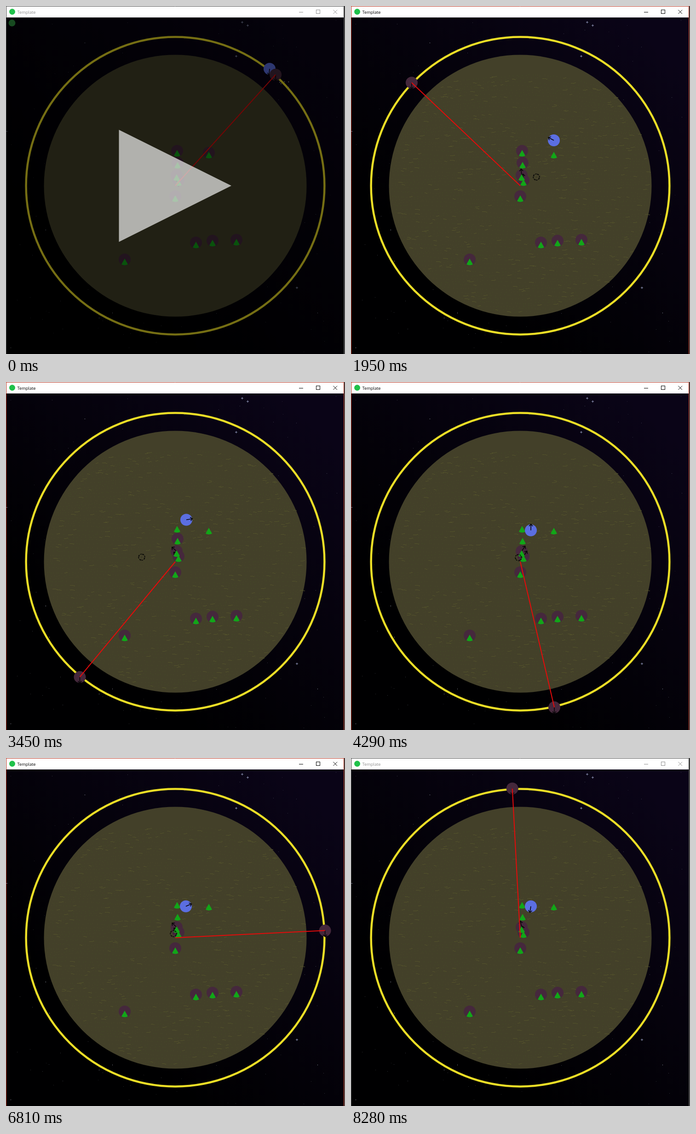
An HTML page with a canvas for the animation above (8340 ms loop, 737 by 759 pixels).

```html
<!DOCTYPE html>
<html lang="en">
<head>
<meta charset="utf-8">
<title>Template</title>
<style>
html, body { margin: 0; width: 100%; height: 100%; overflow: hidden; background: #000; }
canvas { display: block; }
</style>
</head>
<body>
<canvas id="stage" width="737" height="759"></canvas>
<script>
const W = 737, H = 759, LOOP = 8340, STEP = 30;
const START = 570, PAUSE = 5340, RESUME = 6590, BLUR = 8250;
const CX = 368, CY = 392, TAU = Math.PI * 2, DEG = Math.PI / 180;
const ctx = document.getElementById('stage').getContext('2d');

// The first three foes are the ones hit, in order; the next two overlap and swing.
const foes = [[441, 320], [372, 316], [373, 342], [375, 380], [371, 369],
  [368, 415], [413, 516], [449, 512], [501, 510], [258, 553]];
const home = { x: 573, y: 137 };
const hops = [
  { start: START, end: 1170, x: 441, y: 293 },
  { start: 2400, end: 2620, x: 392, y: 300.5 },
  { start: 3990, end: 4080, x: 391, y: 323.5 }];
const glides = [
  { start: 2250, end: 2900, x: 295, y: 382 },
  { start: 3930, end: 4200, x: 364, y: 383 },
  { start: 6900, end: 7380, x: 713, y: 73 },
  { start: 7410, end: 8220, x: 726, y: 37 }];

// Follows straight moves from a first point.
function follow(from, moves, t) {
  let { x, y } = from;
  for (const m of moves) {
    const k = Math.min(1, Math.max(0, (t - m.start) / (m.end - m.start)));
    x += (m.x - x) * k;
    y += (m.y - y) * k;
  }
  return [x, y];
}

// Time spent in play, without the start screen and the pause.
function playTime(t) {
  const run = Math.max(0, Math.min(t, BLUR) - START + STEP);
  const held = Math.max(0, Math.min(t, RESUME) - PAUSE);
  return t < START ? 0 : run - held;
}

function seeded(seed) {
  return () => (seed = (seed * 16807) % 2147483647) / 2147483647;
}

function layer(paint) {
  const c = document.createElement('canvas');
  c.width = W;
  c.height = H;
  paint(c.getContext('2d'));
  return c;
}

function disc(g, x, y, r, color) {
  g.fillStyle = color;
  g.beginPath();
  g.arc(x, y, r, 0, TAU);
  g.fill();
}

function line(g, color, width, ...pts) {
  g.strokeStyle = color;
  g.lineWidth = width;
  g.beginPath();
  pts.forEach(([x, y], i) => i ? g.lineTo(x, y) : g.moveTo(x, y));
  g.stroke();
}

const world = layer(g => {
  const sky = g.createLinearGradient(190, 560, 640, 60);
  sky.addColorStop(0, '#000001');
  sky.addColorStop(1, '#0a0417');
  g.fillStyle = sky;
  g.fillRect(0, 0, W, H);

  const rnd = seeded(71);
  for (let i = 0; i < 170; i++) {
    const x = rnd() * W | 0, y = 26 + rnd() * 730 | 0;
    g.fillStyle = i % 6 ? `rgba(150,155,175,${0.2 + rnd() * 0.3})` : '#c0c4d6';
    g.fillRect(x, y, 1, 1);
    if (i % 24) continue;
    g.fillStyle = '#8c91b4';
    g.fillRect(x - 2, y, 5, 1);
    g.fillRect(x, y - 2, 1, 5);
  }
  disc(g, CX, CY, 285.5, '#434029');
  g.strokeStyle = '#ecde26';
  g.lineWidth = 4.5;
  g.beginPath();
  g.arc(CX, CY, 324.4, 0, TAU);
  g.stroke();
});

const grass = layer(g => {
  const rnd = seeded(2024);
  for (let y = 150; y < 676; y += 7.5) {
    const bend = Math.max(0, (300 - y) / 150);
    for (let x = 84; x < 652; x += 3 + rnd() * 8) {
      const d = (x - CX) / 285;
      const py = y + bend * d * d * 60 + Math.sin(x / 37 + y) * 2 + rnd() * 3;
      const r = Math.hypot(x - CX, py - CY);
      if (r > 280 || r < 40) continue;
      const dash = rnd() < 0.09;
      g.fillStyle = dash ? '#54532b' : rnd() < 0.5 ? '#465223' : '#4c4b29';
      const len = dash ? 3 + rnd() * 6 | 0 : 1;
      g.fillRect(x | 0, py | 0, len, 1);
      if (dash) g.fillRect((x | 0) + len, (py | 0) + (rnd() < 0.5 ? 1 : -1), 3, 1);
    }
  }
});

function arrow(x, y, deg) {
  ctx.save();
  ctx.translate(x, y);
  ctx.rotate(-deg * DEG);
  line(ctx, '#080608', 1.6, [0, 0], [13, 0]);
  line(ctx, '#080608', 1.6, [9, -4], [13.5, 0], [9, 4]);
  ctx.restore();
}

function tree(x, y) {
  ctx.fillStyle = '#12a618';
  ctx.beginPath();
  ctx.moveTo(x, y - 2);
  ctx.lineTo(x + 7, y + 10.5);
  ctx.quadraticCurveTo(x, y + 14.5, x - 7, y + 10.5);
  ctx.fill();
}

function crosshair(x, y, t) {
  ctx.save();
  ctx.translate(x, y);
  ctx.rotate(t / 1000);
  ctx.setLineDash([3.4, 1.94]);
  ctx.strokeStyle = '#050505';
  ctx.lineWidth = 1.6;
  ctx.beginPath();
  ctx.arc(0, 0, 6.8, 0, TAU);
  ctx.stroke();
  ctx.setLineDash([]);
  for (let i = 0; i < 4; i++) {
    ctx.rotate(TAU / 4);
    line(ctx, '#050505', 1.2, [5, 0], [7.6, 0]);
  }
  ctx.restore();
  ctx.fillStyle = '#050505';
  ctx.fillRect(x - 0.5, y - 0.5, 1, 1);
}

function label(text, x, y, spacing = 0) {
  ctx.letterSpacing = spacing + 'px';
  ctx.fillText(text, x, y);
  ctx.strokeText(text, x, y);
  ctx.letterSpacing = '0px';
}

function pauseText() {
  ctx.fillStyle = ctx.strokeStyle = '#fff';
  ctx.lineWidth = 1.2;
  ctx.font = 'bold 23px "DejaVu Sans Mono", monospace';
  label('PAUSE', 328.5, 291);
  label('Resume', 291.5, 315, 1.5);
  label(':', 389.5, 315);
  label('[P]', 403, 315);
}

function startScreen() {
  ctx.fillStyle = 'rgba(0,0,0,.5)';
  ctx.fillRect(0, 25, W, H);
  disc(ctx, 13, 37, 7.5, '#174a20');
  ctx.fillStyle = 'rgba(255,255,255,.65)';
  ctx.beginPath();
  ctx.moveTo(245.5, 270);
  ctx.lineTo(490, 392);
  ctx.lineTo(245.5, 514.5);
  ctx.fill();
}

function sparks(x, y) {
  const rnd = seeded(9);
  ctx.fillStyle = '#888';
  for (let i = 0; i < 5; i++) ctx.fillRect(x + 8 + rnd() * 24, y + 13 + rnd() * 14, 2, 2);
}

function windowFrame(active) {
  const ink = active ? '#000' : '#8f8f8f';
  ctx.fillStyle = '#fff';
  ctx.fillRect(0, 0, 735, 25);
  disc(ctx, 13.5, 12.5, 6.5, '#1fc14a');
  ctx.fillStyle = ink;
  ctx.font = '9.3px "Open Sans", "Noto Sans", sans-serif';
  ctx.fillText('Template', 24.5, 16.5);
  line(ctx, ink, 1, [637, 13.5], [646, 13.5]);
  ctx.strokeRect(674.5, 8.5, 8, 8);
  line(ctx, ink, 1, [711.5, 8.5], [720, 17]);
  line(ctx, ink, 1, [720, 8.5], [711.5, 17]);
  ctx.fillStyle = '#444';
  ctx.fillRect(735, 0, 2, H);
  line(ctx, active ? '#b8321f' : '#444', 1, [0.5, H], [0.5, 0.5], [734.5, 0.5], [734.5, H]);
}

function draw(t) {
  const idle = t < START, active = !idle && t < BLUR, play = playTime(t);
  ctx.drawImage(world, 0, 0);
  if (!idle) ctx.drawImage(grass, 0, 0);

  foes.forEach(([x, y], i) => {
    if (!hops[i] || t < hops[i].end) disc(ctx, x, y, 13, '#45283c');
  });
  const swing = 95 + 45 * Math.cos((play - 2910) / 2000 * TAU);
  for (const [x, y] of foes.slice(3, 5)) arrow(x, y, idle ? -90 : swing);
  for (const [x, y] of foes) tree(x, y);

  const [px, py] = follow(home, hops, t);
  disc(ctx, px, py, 13, '#5b6ee1');
  arrow(px, py, -95 - 0.335 * play);

  const a = (48 + 0.0627 * play) * DEG;
  const ox = CX + 326 * Math.cos(a), oy = CY - 326 * Math.sin(a);
  disc(ctx, ox, oy, 13, '#45283c');
  arrow(ox, oy, -90);
  line(ctx, '#e60a0a', 2, [CX, CY], [ox, oy]);

  if (idle) {
    sparks(ox, oy);
    startScreen();
  }
  if (active) crosshair(...follow({ x: 403, y: 373 }, glides, t), t);
  if (t >= PAUSE && t < RESUME - STEP) pauseText();
  windowFrame(active);
}

function tick() {
  const t = performance.now() % LOOP;
  draw(Math.floor(t / STEP) * STEP);
  requestAnimationFrame(tick);
}
tick();
</script>
</body>
</html>
```
